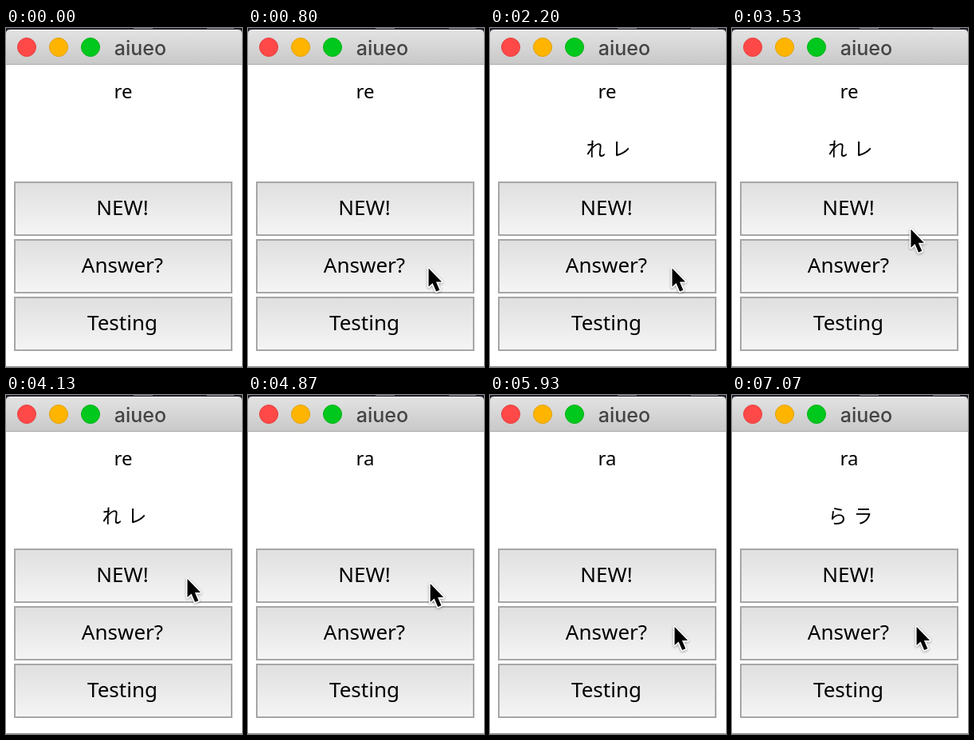
Recreate the animation shown at these times as an HTML page. Size 296 by 424 pixels, loop 8070 ms.

```html
<!DOCTYPE html>
<html lang="ja">
<head>
<meta charset="utf-8">
<style>
  html, body { margin: 0; width: 100%; height: 100%; overflow: hidden; background: #23222d; }
  svg { display: block; }
  text { font: 500 24px "Noto Sans", "Noto Sans CJK JP", "Noto Sans CJK", sans-serif; text-anchor: middle; }
  .title { font: 500 25px Inter, sans-serif; fill: #444; }
  #answer { word-spacing: 2px; }
  .button text { font-size: 26px; }
  .button rect { fill: url(#up); stroke: #a6a6a6; stroke-width: 2; }
  .button.pressed rect { fill: url(#down); }
  #cursor { filter: drop-shadow(0 1.5px 1.5px rgba(0, 0, 0, .35)); }
</style>
</head>
<body>
<svg width="296" height="424" viewBox="0 0 296 424">
  <defs>
    <linearGradient id="bar" x2="0" y2="1"><stop stop-color="#e3e3e3"/><stop offset="1" stop-color="#c8c8c8"/></linearGradient>
    <linearGradient id="up" x2="0" y2="1"><stop stop-color="#dfdfdf"/><stop offset="1" stop-color="#f5f5f5"/></linearGradient>
    <linearGradient id="down" x2="0" y2="1"><stop stop-color="#c4c4c4"/><stop offset="1" stop-color="#d9d9d9"/></linearGradient>
  </defs>
  <path d="M160 .5h24M252 .5h34" stroke="#85858f"/>
  <path d="M0 46h296v377.5H0z" fill="#fff"/>
  <path d="M0 46V7q0-5 5-5h286q5 0 5 5v39z" fill="url(#bar)"/>
  <path d="M5 2.5h286" stroke="#f4f4f4"/>
  <path d="M0 45.5h296" stroke="#acacac"/>
  <circle cx="26" cy="24" r="11.5" fill="#ff4848" stroke="#e5403f"/>
  <circle cx="66" cy="24" r="11.5" fill="#ffb500" stroke="#e3a000"/>
  <circle cx="106" cy="24" r="11.5" fill="#00c81c" stroke="#00b118"/>
  <text class="title" x="168.5" y="34">aiueo</text>
  <text id="prompt" x="147" y="88"></text>
  <text id="answer" x="148.5" y="160"></text>
  <g id="buttons"></g>
  <path id="cursor" d="M0 0V23L5 18.4L9.6 29L13.8 27.2L9.4 17H16.5Z" stroke="#fff" stroke-width="3.4" stroke-linejoin="round" paint-order="stroke"/>
</svg>
<script>
const $ = id => document.getElementById(id);
const LOOP = 8070, FPS = 15;

// Pointer moves: first and last step, destination, sideways bow
const moves = [
  { from: 0, to: 8, x: 226.5, y: 300.5, bow: 0 },
  { from: 32, to: 33, x: 228.5, y: 300.5, bow: 0 },
  { from: 46, to: 60, x: 225.5, y: 231, bow: -2 },
  { from: 60, to: 62, x: 227.5, y: 230, bow: 0 },
  { from: 72, to: 89, x: 231.5, y: 290, bow: 4 }
];

const buttons = ["NEW!", "Answer?", "Testing"].map((label, i) => {
  const g = document.createElementNS("http://www.w3.org/2000/svg", "g");
  const y = 192 + 72 * i;
  g.setAttribute("class", "button");
  g.innerHTML = `<rect x="11" y="${y + 1}" width="272" height="66"/><text x="146" y="${y + 42}">${label}</text>`;
  return $("buttons").appendChild(g);
});

const easeOut = p => 1 - (1 - p) ** 1.75;

function pointerAt(step) {
  let x = 300, y = 303;
  for (const move of moves) {
    const p = Math.max(0, Math.min(1, (step - move.from) / (move.to - move.from)));
    x += (move.x - x) * easeOut(p) + move.bow * Math.sin(Math.PI * p);
    y += (move.y - y) * easeOut(p);
  }
  return [x, y];
}

function draw(now) {
  const step = Math.min(120, Math.floor((now % LOOP + 4) * FPS / 1000));
  const within = (from, to) => step >= from && step < to;

  $("prompt").textContent = step < 67 ? "re" : "ra";
  $("answer").textContent = within(24, 67) ? "れ レ" : step >= 106 ? "ら ラ" : "";
  buttons[0].classList.toggle("pressed", within(66, 67));
  buttons[1].classList.toggle("pressed", within(22, 24) || within(104, 106));
  $("cursor").setAttribute("transform", `translate(${pointerAt(step)})`);
}

const start = performance.now();
function tick() {
  draw(performance.now() - start);
  requestAnimationFrame(tick);
}
tick();
</script>
</body>
</html>
```
